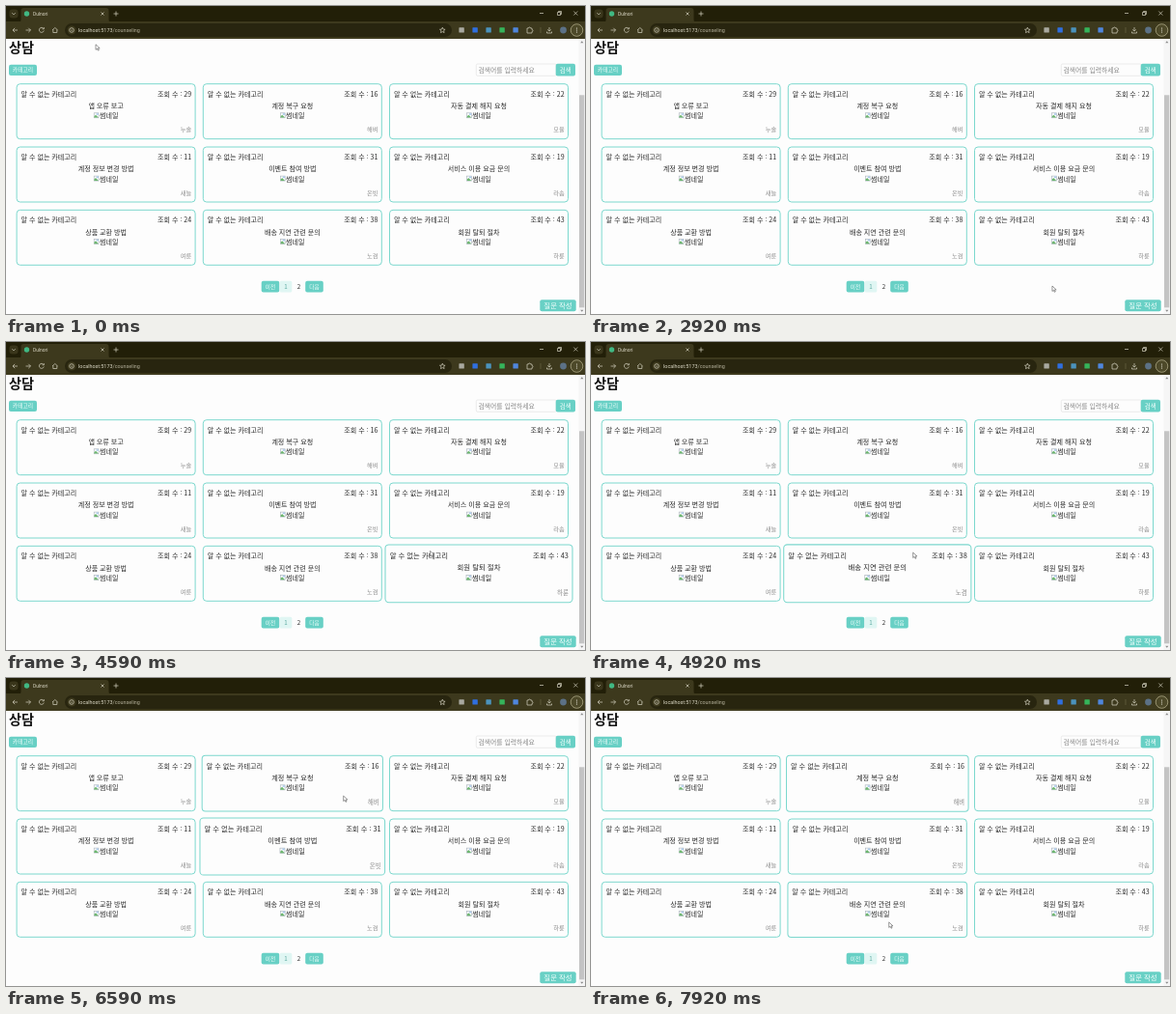
An HTML page for the animation above (8 s loop, 600x319 px).

```html
<!DOCTYPE html>
<html lang="ko">
<head>
<meta charset="utf-8">
<style>
  html, body { margin: 0; width: 100%; height: 100%; overflow: hidden; background: #fdfdfd; }
  svg { display: block; width: 600px; height: 319px; font-family: "Noto Sans CJK KR", "Noto Sans CJK", sans-serif; }
  .ui { font-family: Roboto, sans-serif; }
  .line { fill: none; stroke: #d6d3c2; stroke-width: .7; }
</style>
</head>
<body>
<svg id="stage" viewBox="0 0 600 319"></svg>
<script>
const TEAL = '#68d0c5', EDGE = '#7cd8ce', PAPER = '#fdfdfd', BODY = 7.05;
const LOOP = 8000, STEP = 1000 / 12, FADE = 300;

const rect = (x, y, w, h, fill, r = 0, extra = '') =>
  `<rect x="${x}" y="${y}" width="${w}" height="${h}" rx="${r}" fill="${fill}" ${extra}/>`;
const circle = (x, y, r, fill, extra = '') =>
  `<circle cx="${x}" cy="${y}" r="${r}" fill="${fill}" ${extra}/>`;
const path = (d, extra = 'class="line"') => `<path d="${d}" ${extra}/>`;
// y is the vertical middle of the glyphs
const text = (s, x, y, size, fill = '#2a2a2a', anchor = 'start', extra = '') =>
  `<text x="${x}" y="${y + size * .37}" font-size="${size}" fill="${fill}" text-anchor="${anchor}" ${extra}>${s}</text>`;
const button = (s, x, y, w, h, size) =>
  rect(x, y, w, h, TEAL, 2) + text(s, x + w / 2, y + h / 2, size, '#f4fffd', 'middle');

const browser = () =>
  rect(0, 0, 600, 34, '#221f08') +
  rect(3.5, 3.5, 9, 9, '#3a361b', 3) + path('M6.3 7.2l1.7 1.7 1.7-1.7') +
  path('M13 17q2.5 0 2.5-3V5q0-3 3-3h85q3 0 3 3v9q0 3 2.5 3z', 'fill="#3d391d"') +
  rect(0, 16, 600, 18, '#3d391d') +
  circle(21.5, 8, 2.7, '#41b883') +
  text('Dulnori', 28, 8, 4.9, '#dedbc9', 'start', 'class="ui"') +
  path('M98.5 6.5l3 3m0-3l-3 3M111.5 8h5m-2.5-2.5v5') +
  path('M553 7.5h4M571.5 6.5h3v3h-3zM572.5 6.5v-1h3v3h-1M588.3 5.5l4 4m0-4l-4 4') +
  path('M12 25H7m2.2-2.2L7 25l2.2 2.2M20.5 25h5m-2.2-2.2l2.2 2.2-2.2 2.2') +
  path('M39 23.5a2.5 2.5 0 1 0 .3 2M39.3 22v1.8h-1.8M48 25l2.8-2.5 2.8 2.5M48.8 24.5v3h4v-3') +
  rect(61, 18, 401, 14, '#28250f', 7) +
  circle(68, 25, 4.5, '#3d391d') + circle(68, 25, 2.3, 'none', 'class="line"') + path('M68 24.5v1.5') +
  text('localhost:5173<tspan fill="#b5b19c">/counseling</tspan>', 75, 25, 5.4, '#dedbc9', 'start', 'class="ui"') +
  path('M452.3 22.2l.8 1.9 2 .2-1.5 1.3.5 2-1.8-1-1.8 1 .5-2-1.5-1.3 2-.2z') +
  ['#a9a9a0', '#2f6fe0', '#4b93bd', '#35b45a', '#4f86dd']
    .map((c, i) => rect(469.4 + i * 14, 22.2, 5.4, 5.4, c, .6)).join('') +
  path('M540 23h1.5a1 1 0 0 1 2 0h1.5v1.5a1 1 0 0 1 0 2v1.5h-5z') +
  path('M554 22v6', 'stroke="#6b6645" stroke-width=".7"') +
  path('M563 22v4m-1.8-1.6l1.8 1.7 1.8-1.7M560.5 26.5v1.5h5v-1.5') +
  circle(577.5, 25, 3.4, '#5c7186') +
  circle(591.5, 25, 6.3, '#4d4929', 'stroke="#cfc9a5" stroke-width=".6"') +
  [23, 25, 27].map(y => circle(591.5, y, .6, '#f1efe2')).join('');

const page = () =>
  text('상담', 3, 43.2, 14.2, '#111', 'start', 'font-weight="700"') +
  button('카테고리', 3, 60.7, 29, 11.3, 5.8) +
  rect(487.3, 60, 83, 12.3, PAPER, 1.5, 'stroke="#e2e2e2" stroke-width=".7"') +
  text('검색어를 입력하세요', 489.5, 66, 6.8, '#888') +
  button('검색', 569.7, 59.7, 20.3, 12.8, 6.5) +
  button('이전', 264.7, 284.7, 18.6, 11.8, 5.6) +
  rect(283.5, 284.7, 12.8, 11.8, '#e0f6f3', 1.5) + text('1', 290, 290.6, 6.2, '#5aa9a0', 'middle') +
  text('2', 303.5, 290.6, 6.2, '#2a2a2a', 'middle') +
  button('다음', 310.2, 284.7, 18.6, 11.8, 5.6) +
  button('질문 작성', 553.3, 304.2, 37.4, 12, 7.4) +
  rect(593.5, 34, 6.5, 285, '#f6f6f6') + rect(594, 92.3, 5.3, 220, '#c4c4c4') +
  path('M595.2 38.3l1.6-2 1.6 2zM595.2 314.8l1.6 2 1.6-2z', 'fill="#888"');

const cards = [
  ['앱 오류 보고', 29, '누솔'], ['계정 복구 요청', 16, '해벼'], ['자동 결제 해지 요청', 22, '모율'],
  ['계정 정보 변경 방법', 11, '새늘'], ['이벤트 참여 방법', 31, '온빗'], ['서비스 이용 요금 문의', 19, '라솜'],
  ['상품 교환 방법', 24, '여룬'], ['배송 지연 관련 문의', 38, '노겸'], ['회원 탈퇴 절차', 43, '하륜'],
];

// Drawn around the card's own centre so that scaling needs no origin
const card = ([title, views, author]) => '<g class="card">' +
  rect(-92.5, -28.5, 185, 57, PAPER, 3.5, `stroke="${EDGE}"`) +
  text('알 수 없는 카테고리', -88.1, -18, BODY) +
  text(`조회 수 : ${views}`, 88.6, -18, BODY, '#2a2a2a', 'end') +
  text(title, 0, -5.8, BODY, '#2a2a2a', 'middle') +
  rect(-12.4, 1.6, 4.8, 5, PAPER, 0, 'stroke="#a5afb8" stroke-width=".6"') +
  path('M-12.2 6.4v-1.4l1.6-1.5 2.8 2.9z', 'fill="#6bb56e"') + rect(-10, 2, 2.2, 1.6, '#a9c9ec') +
  text('썸네일', -6.7, 4.4, BODY) +
  text(author, 88.6, 19, 6.2, '#8c8c8c', 'end') + '</g>';

const stage = document.getElementById('stage');
stage.innerHTML = page() + cards.map(card).join('') + browser() +
  path('M0 0v5.5l1.4-1.2.9 2 1-.4-.9-2h1.8z',
    'id="cursor" fill="#fff" stroke="#555" stroke-width=".6"');
const cardNodes = [...stage.querySelectorAll('.card')];
const cursor = document.getElementById('cursor');

// card, pointer enters, pointer leaves
const hovers = [[8, 3545, 4570], [7, 4650, 5680], [4, 5775, 6525], [1, 6530, 7810], [7, 7890, 9000]];

// time, x, y
const track = [
  [2340, 93, 39.8], [2920, 478, 290], [3370, 476, 288], [3670, 470.2, 218], [3840, 468, 215],
  [4480, 466, 216], [4840, 333.7, 218], [5200, 333.7, 218], [5340, 335, 219],
  [5620, 335, 219], [6000, 340.2, 173.5], [6090, 340.5, 171], [6320, 340.5, 171],
  [6590, 349.7, 122], [6900, 352, 113], [7690, 351, 114], [7920, 308.7, 253],
];

const clamp = v => Math.min(1, Math.max(0, v));

// CSS "ease": cubic-bezier(.25, .1, .25, 1)
function ease(x) {
  let lo = 0, hi = 1;
  for (let i = 0; i < 14; i++) {
    const s = (lo + hi) / 2;
    if (.75 * s * (1 - s) + s ** 3 < x) lo = s; else hi = s;
  }
  const s = (lo + hi) / 2;
  return .3 * s * (1 - s) ** 2 + 3 * s * s * (1 - s) + s ** 3;
}

function cursorAt(t) {
  const i = track.findIndex(k => k[0] > t);
  if (i < 1) return track.at(i).slice(1);
  const [t0, x0, y0] = track[i - 1], [t1, x1, y1] = track[i];
  const u = (t - t0) / (t1 - t0), k = u * u * (3 - 2 * u);
  return [x0 + (x1 - x0) * k, y0 + (y1 - y0) * k];
}

function draw(t) {
  const grow = Array(9).fill(0);
  for (const [i, enter, leave] of hovers)
    if (t > enter) grow[i] += ease(clamp((t - enter) / FADE)) - ease(clamp((t - leave) / FADE));
  cardNodes.forEach((node, i) => {
    const x = 103.6 + i % 3 * 193.2, y = 109.2 + Math.floor(i / 3) * 65.3;
    node.setAttribute('transform', `translate(${x} ${y}) scale(${1 + .05 * grow[i]})`);
  });
  cursor.setAttribute('transform', `translate(${cursorAt(t)})`);
}

const start = performance.now();
function tick() {
  const t = (performance.now() - start) % LOOP;
  draw(Math.floor(t / STEP) * STEP);
  requestAnimationFrame(tick);
}
tick();
</script>
</body>
</html>
```
